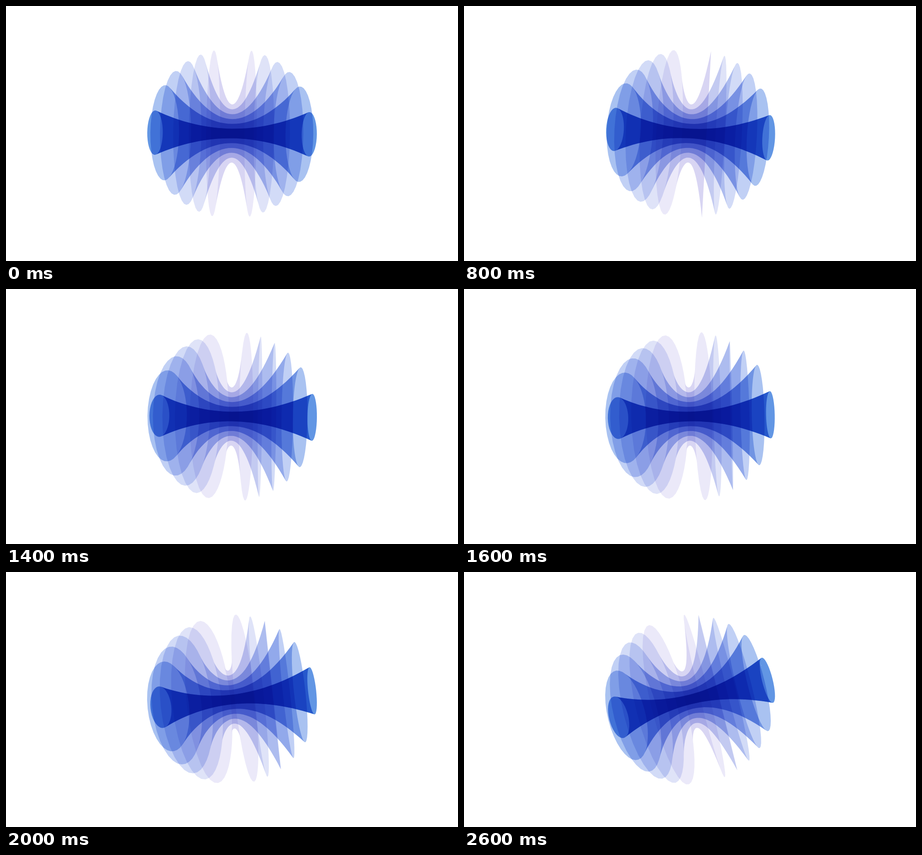
Recreate the animation shown at these times as an HTML page with a canvas. Size 996 px wide and 562 px high, loop 2.7 s.

```html
<!DOCTYPE html>
<html lang="en">
<head>
<meta charset="utf-8">
<title>Nested hourglasses</title>
<style>
  html, body { margin: 0; width: 100%; height: 100%; overflow: hidden; background: #fff; }
  canvas { display: block; }
</style>
</head>
<body>
<canvas id="stage" width="996" height="562"></canvas>
<script>
const ctx = document.getElementById('stage').getContext('2d');
const STEP = 100, STEPS = 27;
const CAMERA = 490, SPHERE = 175.2;
const SIDES = 40, SLICES = 32;

// Single-layer tints from the innermost surface outwards; layers multiply.
const tints = [
  'rgb(98,150,228)', 'rgb(169,194,241)', 'rgb(193,208,245)',
  'rgb(210,219,247)', 'rgb(223,227,248)', 'rgb(235,233,249)'
];

// [step, tilt in degrees, yaw in degrees]
const poses = [
  [0, -0.63, 0.3], [4, -2.5, 1.9], [8, -3.14, 4.25], [12, -1.96, 7.35],
  [16, 1.25, 9.9], [20, 6.2, 10.65], [26, 14, 7.2]
];

// Parabola through three neighbouring poses, starting at index i.
function parabola(i, step, col) {
  const [a, b, c] = poses.slice(i, i + 3);
  const ab = (b[col] - a[col]) / (b[0] - a[0]);
  const bc = (c[col] - b[col]) / (c[0] - b[0]);
  return a[col] + (step - a[0]) * (ab + (step - b[0]) * (bc - ab) / (c[0] - a[0]));
}

// Smooth curve: blend of the two parabolas that share a segment.
function poseAngle(step, col) {
  const last = poses.length - 2;
  let i = 0;
  while (i < last && step > poses[i + 1][0]) i++;
  const w = (step - poses[i][0]) / (poses[i + 1][0] - poses[i][0]);
  const before = parabola(Math.max(i - 1, 0), step, col);
  const after = parabola(Math.min(i, last - 1), step, col);
  return (before + (after - before) * w) * Math.PI / 180;
}

// Projected grid of a surface of revolution whose rims lie on the sphere.
function project(index, yaw) {
  const half = 168.3 - 26.4 * index;
  const waist = 10.6 * (index + 1);
  const flare = Math.sqrt(SPHERE ** 2 - half ** 2) - waist;
  const c = Math.cos(yaw), s = Math.sin(yaw);
  const rings = [];
  for (let i = 0; i <= SLICES; i++) {
    const u = 2 * i / SLICES - 1;
    const radius = waist + flare * u * u;
    const ring = [];
    for (let j = 0; j <= SIDES; j++) {
      const phi = 2 * Math.PI * (j % SIDES) / SIDES;
      const depth = radius * Math.sin(phi);
      const scale = CAMERA / (CAMERA - half * u * s - depth * c);
      ring.push([(half * u * c - depth * s) * scale, -radius * Math.cos(phi) * scale]);
    }
    rings.push(ring);
  }
  return rings;
}

function addTriangle(walls, p, q, r) {
  const area = (q[0] - p[0]) * (r[1] - p[1]) - (q[1] - p[1]) * (r[0] - p[0]);
  const wall = walls[area > 0 ? 0 : 1];
  wall.moveTo(p[0], p[1]);
  wall.lineTo(q[0], q[1]);
  wall.lineTo(r[0], r[1]);
  wall.closePath();
}

function drawSurface(index, yaw) {
  const rings = project(index, yaw);
  const walls = [new Path2D(), new Path2D()];
  for (let i = 0; i < SLICES; i++) {
    for (let j = 0; j < SIDES; j++) {
      const a = rings[i][j], b = rings[i + 1][j];
      const c = rings[i + 1][j + 1], d = rings[i][j + 1];
      addTriangle(walls, a, b, c);
      addTriangle(walls, a, c, d);
    }
  }
  ctx.fillStyle = tints[index];
  walls.forEach(wall => ctx.fill(wall));
}

function draw(step) {
  ctx.setTransform(1, 0, 0, 1, 0, 0);
  ctx.globalCompositeOperation = 'source-over';
  ctx.fillStyle = '#fff';
  ctx.fillRect(0, 0, 996, 562);
  ctx.globalCompositeOperation = 'multiply';
  ctx.translate(498, 281);
  ctx.rotate(-poseAngle(step, 1));
  const yaw = poseAngle(step, 2);
  tints.forEach((_, index) => drawSurface(index, yaw));
}

let shown = -1;
function tick() {
  const step = Math.floor(performance.now() / STEP) % STEPS;
  if (step !== shown) draw(shown = step);
  requestAnimationFrame(tick);
}
tick();
</script>
</body>
</html>
```
